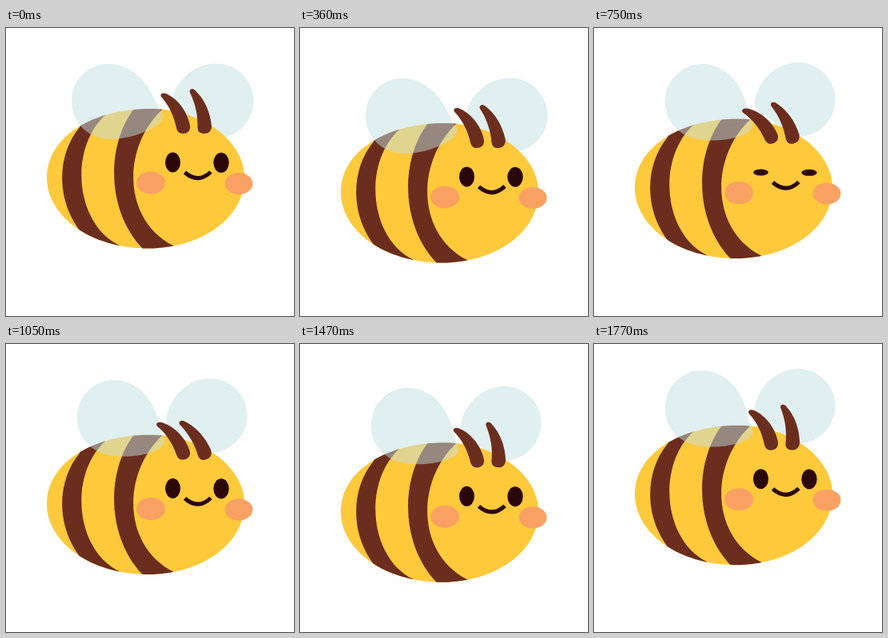
Animation, 360 px wide and 360 px high, one loop 1800 ms. Source, as an HTML page:

```html
<!DOCTYPE html>
<html lang="en">
<head>
<meta charset="utf-8">
<title>Bee</title>
<style>
  html, body { margin: 0; width: 100%; height: 100%; overflow: hidden; background: #fff; }
  svg { display: block; width: 100%; height: 100%; }
  .wing { fill: #c1dfdf; fill-opacity: .5; }
  .brown { fill: #6b2e1e; }
  .dark { fill: #2b070a; }
  .cheek { fill: #f9a163; }
</style>
</head>
<body>
<svg viewBox="0 0 360 360">
  <defs>
    <path id="shape" d="M51 187C51 135 110 101 180 101C243 101 298 140 298 187C298 240 240 275.5 178 275.5C105 275.5 51 235 51 187Z"/>
    <clipPath id="inside"><use href="#shape"/></clipPath>
  </defs>
  <g id="bee">
    <path id="wingR" class="wing" d="M263 44.5C237 44.5 220 61 211 78C206 88 208 96 216 101C235 115 240 137 263 137.5C289 137.5 309.5 116 309.5 91C309.5 66 289 44.5 263 44.5Z"/>
    <use href="#shape" fill="#ffc93c"/>
    <g class="brown" clip-path="url(#inside)">
      <path d="M92 124C62 160 62 220 98 260V280L142 272C86 245 78 150 125 108L100 95Z"/>
      <path d="M160 101C126 145 124 228 172 277H212L209 272C146 240 144 150 196 101V95H160Z"/>
    </g>
    <path id="wingL" class="wing" d="M128 45C158 45 177 68 188 94C191 100 194 103 196 107C198 112 194 117 189 121C174 132 150 139 130 139C103 139 82 118 82 92C82 66 102 45 128 45Z"/>
    <path id="feelerL" class="brown" d="M194 86C192 82 196 80.5 200 82C214 88 227 104 230 122C231 129 226 132 221 132C216 132 214 129 213 125C210 110 204 97 194 86Z"/>
    <path id="feelerR" class="brown" d="M230 81C228 76 234 75 236.5 78C249 90 255 105 257 122C257 129 253 132 248 132C243 132 240 130 239.5 125C240 110 237 95 230 81Z"/>
    <ellipse class="cheek" cx="181" cy="193.5" rx="18" ry="14"/>
    <ellipse class="cheek" cx="291" cy="194.5" rx="17.5" ry="13.5"/>
    <ellipse class="dark eye" cx="208.5" cy="168" rx="9.5" ry="12.5"/>
    <ellipse class="dark eye" cx="269" cy="168.3" rx="9.7" ry="12.5"/>
    <path d="M223.5 180.5Q240 195 256 180" fill="none" stroke="#2b070a" stroke-width="5"/>
  </g>
</svg>
<script>
const LOOP = 1800, STEP = 30, BOB = 600, FLAP = 11.6;
const dips = [20, 25, 23];
const leftSway = [[0, 0], [360, -1.5], [750, -13], [1050, -8], [1230, -1], [1470, -2.5], [1770, -.5]];
const rightSway = [[0, 0], [360, -6.5], [750, -11.5], [1050, -18], [1230, -2.3], [1470, 3.5], [1770, 4.5]];

const get = id => document.getElementById(id);
const eyes = document.querySelectorAll('.eye');
const smooth = x => x * x * (3 - 2 * x);
const turn = (id, angle, x, y) => get(id).setAttribute('transform', `rotate(${angle} ${x} ${y})`);

function track(keys, t) {
  const i = keys.findIndex(key => key[0] > t);
  if (i < 0) return keys[keys.length - 1][1];
  const [t0, a] = keys[i - 1], [t1, b] = keys[i];
  return a + (b - a) * (t - t0) / (t1 - t0);
}

function draw(t) {
  const phase = (t % BOB) / BOB;
  const dip = dips[Math.floor(t / BOB)] * smooth(1 - Math.abs(2 * phase - 1));
  get('bee').setAttribute('transform', `translate(0 ${dip})`);

  // The wings flip between two poses on every step.
  const flap = (t / STEP) % 2 ? FLAP : 0;
  turn('wingL', flap, 193, 119);
  turn('wingR', -flap, 190, 123);

  turn('feelerL', track(leftSway, t), 222, 124);
  turn('feelerR', track(rightSway, t), 248.5, 124);

  const blink = smooth(Math.max(0, 1 - Math.abs(t - 750) / 150));
  for (const eye of eyes) eye.setAttribute('ry', 12.5 - 8.5 * blink);
}

const start = performance.now();
function tick() {
  const t = (performance.now() - start) % LOOP;
  draw(Math.floor(t / STEP) * STEP);
  requestAnimationFrame(tick);
}
tick();
</script>
</body>
</html>
```
